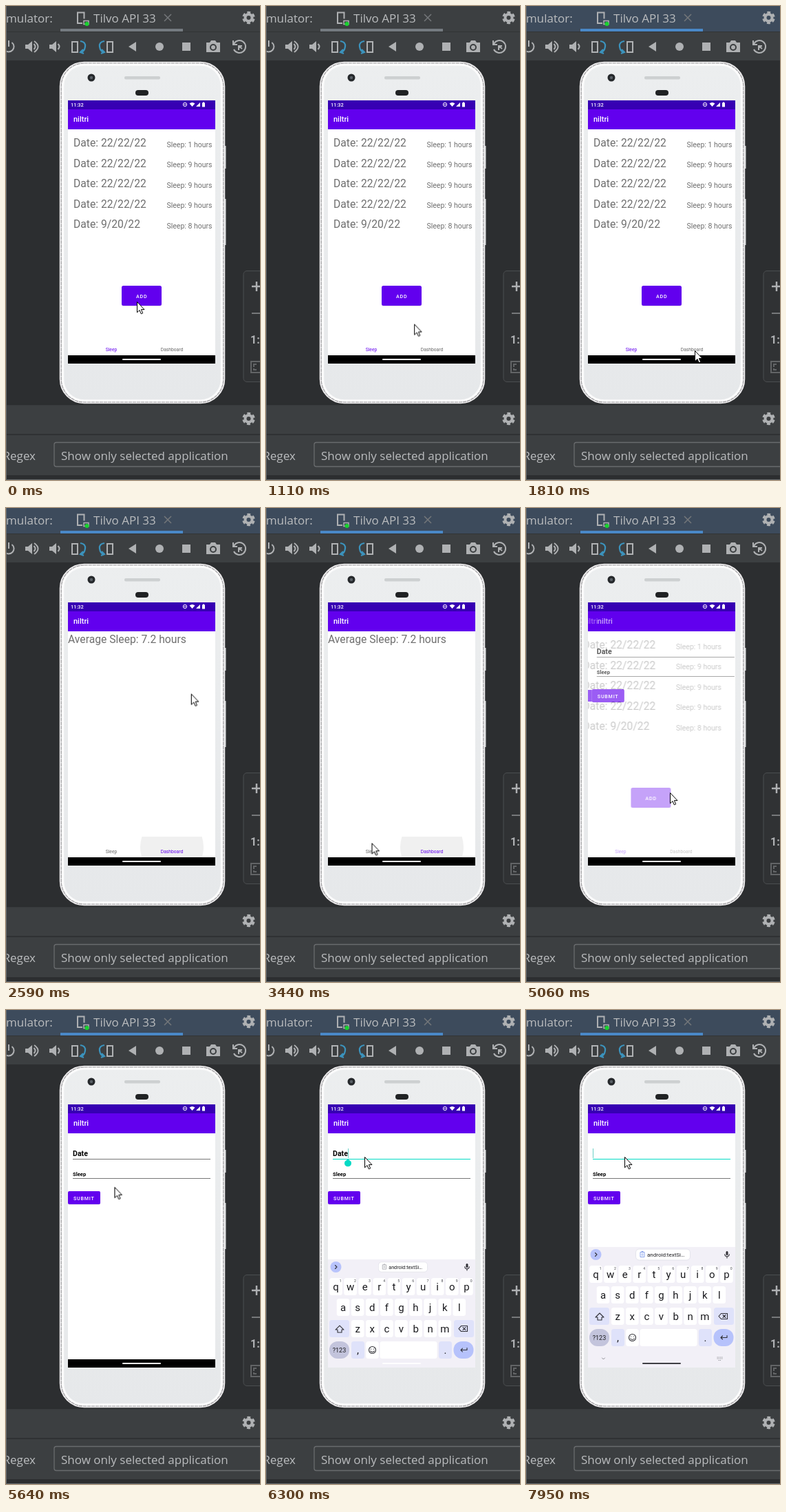
Write an HTML page that moves like this. It is 369 px wide and 688 px high and loops after 8 s.

```html
<!DOCTYPE html>
<html lang="en">
<head>
<meta charset="utf-8">
<title>Sleep tracker in an emulator</title>
<style>
  html, body { margin: 0; width: 100%; height: 100%; overflow: hidden; background: #2c2e30; }
  svg { display: block; width: 100%; height: 100%; }
  text { font-family: Roboto, sans-serif; white-space: pre; }
  .ide { font: 17px "Open Sans", sans-serif; fill: #bbbdbf; }
  .line { fill: none; stroke: #afb1b3; stroke-width: 2; }
  .solid { fill: #afb1b3; }
  .blue { fill: none; stroke: #3b93bd; stroke-width: 2.2; }
  .title { font-size: 11px; font-weight: 500; fill: #fff; }
  .big { font-size: 15.7px; fill: #6f6f6f; }
  .small { font-size: 10.5px; fill: #6f6f6f; text-anchor: end; }
  .tab { font-size: 6.7px; text-anchor: middle; fill: #666; }
  .button { font-size: 7.2px; font-weight: 500; fill: #fff; letter-spacing: .75px; }
  .field { font-weight: 700; fill: #000; }
  .key { font-size: 15px; fill: #1b1b1f; text-anchor: middle; }
  .hint { font-size: 5.2px; fill: #45464f; text-anchor: middle; }
  .glyph { fill: none; stroke: #303036; stroke-width: 1.1; stroke-linejoin: round; stroke-linecap: round; }
  .faint { stroke: #74757c; stroke-width: .8; }
  #chip { transform-origin: 198.5px 355px; }
</style>
</head>
<body>
<svg viewBox="0 0 369 688" preserveAspectRatio="none">
  <defs>
    <clipPath id="screen"><rect x="90" y="137" width="214" height="382"/></clipPath>
    <clipPath id="tabs"><rect x="90" y="477" width="214" height="30"/></clipPath>
    <linearGradient id="shell" x2="0" y2="1">
      <stop offset="0" stop-color="#eceeef"/><stop offset="1" stop-color="#e6e8ea"/>
    </linearGradient>
    <g id="gear" fill="none" stroke="#afb1b3">
      <circle r="7.6" stroke-width="3.4" stroke-dasharray="4.6 3.36" stroke-dashoffset="-1.68"/>
      <circle r="5" stroke-width="4"/>
    </g>
    <g id="speaker">
      <path class="solid" d="M-9-3h4l6-5v16l-6-5h-4z"/>
      <path class="line" d="M3.500-4q4 4 0 8"/>
    </g>
  </defs>

  <!-- IDE frame -->
  <rect id="header" width="369" height="37" fill="#3c3f41"/>
  <rect id="underline" x="79" y="33" width="178" height="4" fill="#747a80"/>
  <rect y="37" width="369" height="42" fill="#3c3f41"/>
  <path d="M0 37.500H369" stroke="#323435"/>
  <text class="ide" y="24">mulator:</text>
  <text class="ide" x="127" y="24">Tilvo API 33</text>
  <path class="line" d="M111 25h-7V9.500h9.500v9"/>
  <path class="line" style="stroke-width:1.500" d="M113 26.500v-5h7v5z"/>
  <circle cx="117.500" cy="26" r="3" fill="#19d32f"/>
  <path d="M230 12l10 10m0-10l-10 10" stroke="#74777a" stroke-width="1.500"/>
  <use href="#gear" x="352.500" y="17"/>

  <!-- Emulator toolbar -->
  <path class="line" d="M4 50v9M8.500 53a7.500 7.500 0 1 1-9 0"/>
  <use href="#speaker" x="37" y="59"/>
  <path class="line" d="M41 51q11 8 0 16"/>
  <use href="#speaker" x="72" y="59"/>
  <path class="line" d="M96 52h8v15h-8zM147 52h8v15h-8z"/>
  <path class="blue" d="M108 51q8 1 7 8t-6 8m3-4l-4 4l5 2M143 51q-8 1-7 8t6 8m-3-4l4 4l-5 2"/>
  <path class="solid" d="M178 59l11-7v14z"/>
  <circle class="solid" cx="223" cy="59" r="6"/>
  <rect class="solid" x="256" y="53" width="12" height="12"/>
  <path class="solid" d="M291 53h5l2-3h6l2 3h5v14h-20z"/>
  <circle cx="301" cy="60" r="4" fill="#afb1b3" stroke="#3c3f41" stroke-width="2"/>
  <path class="line" d="M331 55a9 9 0 1 1 0 8M330 50v6h6M338 64v-6h5M338 58l5 4"/>

  <!-- Zoom panel -->
  <rect x="345" y="384.500" width="40" height="161" rx="5" fill="#303234" stroke="#4b4e50"/>
  <path class="line" style="stroke-width:2.500" d="M357 407h13M364 400v14"/>
  <path class="line" style="stroke:#77797b" d="M357 446h13"/>
  <text x="355" y="490" font-size="16" font-weight="700" fill="#afb1b3">1:1</text>
  <path class="line" style="stroke:#626466" d="M375 516h-19v16h19M360 524v-4h4M360 526v2h4"/>

  <!-- Lower panel -->
  <rect y="578" width="369" height="103" fill="#3c3f41"/>
  <path d="M0 578.500H369M0 622H369" stroke="#2b2d2f" stroke-width="1.500"/>
  <use href="#gear" x="352.500" y="599"/>
  <text class="ide" x="43" y="659" text-anchor="end">Regex</text>
  <rect x="70" y="633.500" width="320" height="35" rx="3" fill="#3c3f41" stroke="#696c6e" stroke-width="1.300"/>
  <text class="ide" x="80" y="659">Show only selected application</text>
  <path d="M.5 0V687.500H369" fill="none" stroke="#66696b"/>

  <!-- Phone -->
  <path d="M318 203v33M318 280v67" stroke="#d9dbdd" stroke-width="3"/>
  <rect x="78.500" y="81.500" width="239" height="495" rx="35" fill="url(#shell)" stroke="#efedee" stroke-width="1.500"/>
  <rect x="82.500" y="85" width="231" height="488" rx="31" fill="none" stroke="#fcfcfc" stroke-width="3.500"/>
  <rect x="80.200" y="83" width="235.600" height="492" rx="33.500" fill="none" stroke="#a19fa1" stroke-width="1.200" stroke-dasharray="5 1"/>
  <rect x="172" y="102" width="52" height="4.500" rx="2" fill="#cdd0d1"/>
  <circle cx="124" cy="104" r="5.500" fill="#25282b"/>
  <circle cx="124" cy="104" r="2.200" fill="#5a6066"/>
  <rect x="188" y="122" width="19" height="8" rx="4" fill="#202224"/>

  <g clip-path="url(#screen)">
    <rect x="90" y="137" width="214" height="382" fill="#fff"/>

    <g id="home">
      <rect x="0" y="150" width="369" height="29" fill="#6200ee"/>
      <text class="title" x="98" y="168">niltri</text>
      <g id="list">
        <g id="rows"></g>
        <rect x="168" y="406.500" width="58" height="29" rx="3" fill="#000" opacity=".12"/>
        <rect id="add" x="168" y="406" width="58" height="29" rx="2.500" fill="#6200ee"/>
        <text class="button" x="189" y="423.500">ADD</text>
      </g>
      <text id="average" class="big" x="90" y="196" opacity="0">Average Sleep: 7.2 hours</text>
      <g clip-path="url(#tabs)">
        <circle id="rippleDash" cx="241" cy="492" r="46"/>
        <circle id="rippleSleep" cx="153" cy="492" r="46"/>
      </g>
      <text id="tabSleep" class="tab" x="153" y="501.300">Sleep</text>
      <text id="tabDash" class="tab" x="241" y="501.300">Dashboard</text>
    </g>

    <g id="fade">
      <rect x="90" y="150" width="214" height="357" fill="#fff"/>
      <rect x="90" y="150" width="214" height="29" fill="#6200ee"/>
      <g id="form">
        <text class="title" x="98" y="168">niltri</text>
        <text id="date" class="field" x="97" y="212" font-size="10.600">Date</text>
        <text class="field" x="97" y="241" font-size="7.600">Sleep</text>
        <path id="dateLine" d="M97 216.500H297" stroke="#767676"/>
        <path d="M97 244.500H297" stroke="#767676"/>
        <rect x="90" y="263.500" width="47" height="19" rx="2" fill="#000" opacity=".12"/>
        <rect x="60" y="264" width="30" height="17" fill="#6200ee"/>
        <rect x="90" y="263" width="47" height="19" rx="2" fill="#6200ee"/>
        <text class="button" x="98" y="275.500">SUBMIT</text>
        <path id="handle" d="M119 216.500l3.600 2.400a5 5 0 1 1-7.200 0z" fill="#03dac5"/>
        <g id="caretShift"><path id="caret" d="M97.500 201V215" stroke="#45c4b8" stroke-width=".8"/></g>
      </g>
    </g>

    <!-- System bars -->
    <rect x="90" y="137" width="214" height="13" fill="#3700b3"/>
    <text x="94" y="146" font-size="7.400" font-weight="500" fill="#fff">11:32</text>
    <circle cx="260" cy="143" r="2.700" fill="none" stroke="#fff" stroke-width=".9"/>
    <path d="M258.500 143h3" stroke="#fff"/>
    <path d="M266.500 141.500q4-3 8 0l-4 4.500zM276 146l6-6v6zM285 140.500h1v-1h2v1h1v6h-4z" fill="#fff"/>
    <rect x="90" y="507" width="214" height="12" fill="#000"/>

    <g id="keyboard">
      <rect x="90" y="344" width="214" height="175" fill="#f2f0f7"/>
      <circle cx="101.500" cy="355" r="8" fill="#b8c3fb"/>
      <path class="glyph" d="M100.500 352.500l2.500 2.500l-2.500 2.500"/>
      <g id="chip">
        <rect x="159.500" y="347" width="79" height="16" rx="5" fill="#fff" stroke="#dfdfe8" stroke-width=".8"/>
        <path id="clip" d="M166 351.500h6v7h-6zM168 351.500v-1h2v1M167.500 354h3M167.500 356h3" fill="none" stroke="#7f9bea" stroke-width=".9"/>
        <text x="176" y="357.800" font-size="8" fill="#1b1b1f">android:textSi…</text>
      </g>
      <rect x="290.500" y="350" width="3" height="6" rx="1.500" fill="#303036"/>
      <path class="glyph" d="M288.800 354.500q0 3.200 3.200 3.200t3.200-3.200M292 358v2"/>
      <g id="keys"></g>
      <path class="glyph" d="M107 440l6 6h-3v4h-6v-4h-3z"/>
      <path class="glyph" d="M280 444.500l3.500-4h9v8h-9zM286 442.500l4 4m0-4l-4 4"/>
      <circle class="glyph" cx="154.500" cy="475.500" r="5"/>
      <path class="glyph" d="M152.500 474v.1M156.500 474v.1M151.800 477q2.700 3 5.400 0"/>
      <path class="glyph" d="M292 472.500v3h-9m2.500-2.500l-2.500 2.500l2.500 2.500"/>
      <path class="glyph faint" d="M110.500 505l2 2l2-2"/>
      <path class="glyph faint" stroke-dasharray=".4 1.800" d="M278 504h8M278 506h8M280 508.500h4"/>
    </g>
    <rect id="pill" x="169" y="512" width="56" height="2" rx="1" fill="#fff"/>
  </g>

  <path id="cursor" d="M.5 .5v15.300l3.500-3.300l2.300 5.300l2.400-1l-2.300-5.200h4.600z" fill="#fff" stroke="#000" stroke-linejoin="round"/>
</svg>

<script>
const LOOP = 8000;
const $ = id => document.getElementById(id);
const sheet = document.head.appendChild(document.createElement('style'));

// Each stop is [milliseconds, declarations, easing towards the next stop].
function timeline(id, stops) {
  const body = stops.map(([ms, css, ease = 'linear']) =>
    `${ms / LOOP * 100}% { ${css}; animation-timing-function: ${ease} }`).join('\n');
  const last = stops[stops.length - 1][1];
  sheet.textContent +=
    `@keyframes ${id} { ${body}\n100% { ${last} } }\n#${id} { animation: ${id} ${LOOP}ms infinite }\n`;
}

const hard = (id, ...stops) => timeline(id, stops.map(([ms, css]) => [ms, css, 'step-end']));
const fade = (id, ...stops) => timeline(id, stops.map(([ms, value]) => [ms, `opacity: ${value}`]));
const shift = (x, y = 0) => `transform: translate(${x}px, ${y}px)`;

// List rows
[['22/22/22', 1], ['22/22/22', 9], ['22/22/22', 9], ['22/22/22', 9], ['9/20/22', 8]].forEach(([day, hours], i) => {
  const y = 204 + i * 29.5;
  $('rows').innerHTML += `<text class="big" x="98" y="${y}">Date: ${day}</text>
    <text class="small" x="299.5" y="${y + 0.8}">Sleep: ${hours} hours</text>`;
});

// Keyboard
function key(cx, cy, width, label = '', fill = '#fff', radius = 3.5, size = 15) {
  $('keys').innerHTML += `<rect x="${cx - width / 2}" y="${cy - 12.5}" width="${width}" height="25" rx="${radius}" fill="${fill}"/>
    <text class="key" x="${cx}" y="${cy + size / 3}" style="font-size:${size}px">${label}</text>`;
}
[['qwertyuiop', 101.5, 383.5], ['asdfghjkl', 112, 413.5], ['zxcvbnm', 133.2, 444.5]].forEach(([letters, x, y], row) => {
  [...letters].forEach((letter, i) => {
    const cx = x + i * 21.1;
    key(cx, y, 18.6, letter);
    if (!row) $('keys').innerHTML += `<text class="hint" x="${cx + 6.8}" y="377">${(i + 1) % 10}</text>`;
  });
});
const tint = '#dfe2fa';
key(106.5, 444.5, 29, '', tint);
key(287.5, 444.5, 29, '', tint);
key(106.5, 475.5, 29, '?123', '#c3c4dc', 12, 9);
key(133.5, 475.5, 19, ',', tint);
key(154.5, 475.5, 18.6);
key(207, 475.5, 83);
key(260.5, 475.5, 19, '.', tint);
key(287, 475.5, 29, '', '#b6c2fb', 12);

// Pointer
timeline('cursor', [
  [0, shift(190, 429)], [840, shift(190, 429), 'ease-in-out'],
  [1410, shift(245, 500)], [2350, shift(245, 500), 'ease-in'],
  [2590, shift(269, 270), 'ease-out'], [2800, shift(242, 210), 'ease-in-out'],
  [3130, shift(188, 308), 'ease-in-out'],
  [3510, shift(151, 499)], [4060, shift(151, 499), 'ease-in'],
  [4260, shift(179, 461), 'ease-out'], [4520, shift(208, 413), 'step-end'],
  [4580, shift(209, 413)], [5330, shift(209, 413), 'ease-in-out'],
  [5790, shift(143, 213)]
]);

// Window focus
hard('header', [0, 'fill: #3c3f41'], [1810, 'fill: #3d4b5c']);
hard('underline', [0, 'fill: #747a80'], [1810, 'fill: #4a88c7']);

// Tab switches
fade('list', [0, 1], [1890, 1], [2110, 0], [3850, 0], [4070, 1]);
fade('average', [0, 0], [1890, 0], [2110, 1], [3850, 1], [4070, 0]);
const active = 'fill: #6200ee', idle = 'fill: #666';
hard('tabSleep', [0, active], [1890, idle], [3850, active]);
hard('tabDash', [0, idle], [1890, active], [3850, idle]);
const ripple = (radius, opacity) => `r: ${radius}px; opacity: ${opacity}`;
timeline('rippleDash', [
  [0, ripple(10, 0)], [1820, ripple(10, 0)], [1850, ripple(20, .12), 'ease-out'],
  [2030, ripple(46, .12)], [2140, ripple(46, .06)], [3800, ripple(46, .06)], [3900, ripple(46, 0)]
]);
timeline('rippleSleep', [
  [0, ripple(10, 0)], [3770, ripple(10, 0)], [3800, ripple(20, .16), 'ease-out'],
  [4000, ripple(46, .16)], [4300, ripple(46, .16)], [4510, ripple(46, 0)]
]);

// Opening the form
timeline('add', [[0, active], [4730, active], [4800, 'fill: #7a2bf1'], [4930, active]]);
const easeIn = 'cubic-bezier(.3, 0, .8, .15)', easeOut = 'cubic-bezier(.05, .7, .1, 1)';
const slide = (id, from, to) => timeline(id, [
  [0, shift(from)], [4958, shift(from), easeIn],
  [5033, shift(from + (to - from) * .4), easeOut], [5408, shift(to)]
]);
slide('home', 0, -21.4);
slide('form', 21.4, 0);
fade('fade', [0, 0], [5008, 0], [5091, 1]);

// Editing the date
const show = 'visibility: visible', hide = 'visibility: hidden';
hard('dateLine', [0, 'stroke: #767676'], [5880, 'stroke: #03dac5']);
hard('handle', [0, hide], [5880, show], [6540, hide]);
hard('date', [0, show], [6540, hide]);
hard('caretShift', [0, shift(22)], [6540, shift(0)]);
hard('caret', [0, hide], [5880, show], [6360, hide], [6840, show], [7320, hide], [7800, show]);

// Keyboard
timeline('keyboard', [[0, shift(0, 175)], [5913, shift(0, 175), 'cubic-bezier(0, 0, .2, 1)'], [6570, shift(0, 0)]]);
timeline('chip', [[0, 'transform: scale(.9)'], [6300, 'transform: scale(.9)', 'ease-out'], [6500, 'transform: scale(1)']]);
timeline('clip', [[0, 'stroke: #a5a6ac'], [6300, 'stroke: #a5a6ac'], [6500, 'stroke: #7f9bea']]);
timeline('pill', [[0, 'fill: #fff'], [6300, 'fill: #fff'], [6570, 'fill: #3f3f44']]);
</script>
</body>
</html>
```
